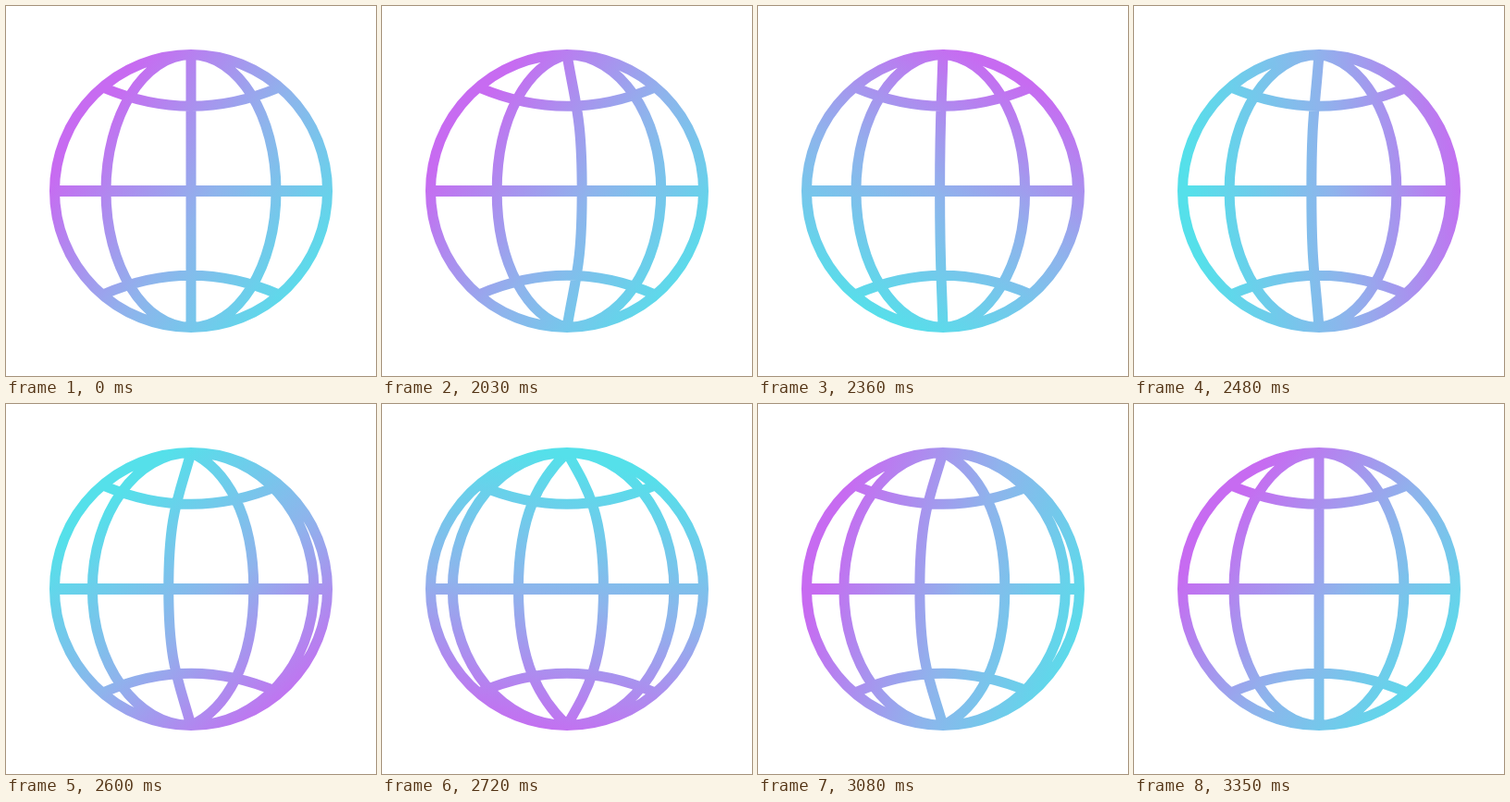
Write an HTML page with a canvas that moves like this. It is 400 by 400 pixels and loops after 3440 ms.

```html
<!DOCTYPE html>
<html lang="en">
<head>
<meta charset="utf-8">
<title>Spinning globe</title>
<style>
  html, body { margin: 0; width: 100%; height: 100%; overflow: hidden; background: #fff; }
  canvas { display: block; width: 100vw; height: 100vh; }
</style>
</head>
<body>
<canvas id="stage" width="400" height="400"></canvas>
<script>
const ctx = document.getElementById('stage').getContext('2d');

const LOOP = 3440, REST = 2000, STEP = 30, STEPS = 45;
const CENTER = 200, RADIUS = 147.5, INNER = 92;
const KAPPA = 0.5523;         // circle-to-Bézier handle ratio
const POLE_HANDLE = 66;       // pole handle of the straight meridian
const TURNS = 7;              // meridian spacings travelled per spin
const START_ANGLE = 216;      // direction of the purple pole, degrees

function cubicBezier(x1, y1, x2, y2) {
  const at = (s, a, b) => 3 * s * (1 - s) ** 2 * a + 3 * s * s * (1 - s) * b + s ** 3;
  return x => {
    if (x <= 0 || x >= 1) return Math.min(1, Math.max(0, x));
    let lo = 0, hi = 1;
    for (let i = 0; i < 30; i++) {
      const mid = (lo + hi) / 2;
      if (at(mid, x1, x2) < x) lo = mid; else hi = mid;
    }
    return at(lo, y1, y2);
  };
}
const spinEase = cubicBezier(0.167, 0.167, 0.455, 1);
const colorEase = cubicBezier(0.333, 0, 0.46, 1);

function makeGradient(progress) {
  const angle = (START_ANGLE + 360 * colorEase(progress)) * Math.PI / 180;
  const mid = 216, dx = 152 * Math.cos(angle), dy = 152 * Math.sin(angle);
  const g = ctx.createLinearGradient(mid + dx, mid + dy, mid - dx, mid - dy);
  g.addColorStop(0, '#c76bf1');
  g.addColorStop(0.5, '#8eb4ec');
  g.addColorStop(1, '#55e0ea');
  return g;
}

// Signed half-width: straight at 0, INNER at 1, the rim at 2.
function bulge(u) {
  const a = Math.abs(u);
  return Math.sign(u) * (a < 1 ? a * INNER : INNER + (a - 1) * (RADIUS - INNER));
}

// Morphs from a straight line through pointed lenses to a half ellipse.
function meridian(u) {
  const rx = bulge(u), side = CENTER + rx, poleX = CENTER + KAPPA * rx;
  const top = CENTER - RADIUS, bottom = CENTER + RADIUS;
  const lean = POLE_HANDLE * Math.max(0, 1 - Math.abs(u));
  const handle = KAPPA * RADIUS;
  ctx.moveTo(CENTER, top);
  ctx.bezierCurveTo(poleX, top + lean, side, CENTER - handle, side, CENTER);
  ctx.bezierCurveTo(side, CENTER + handle, poleX, bottom - lean, CENTER, bottom);
}

function parallel(endY, controlY) {
  ctx.moveTo(106, endY);
  ctx.quadraticCurveTo(CENTER, controlY, 294, endY);
}

function draw(time) {
  const step = Math.floor((time - REST) / STEP);
  const progress = Math.min(1, Math.max(0, step / STEPS));
  const spin = TURNS * spinEase(progress);
  const phase = spin % 1;

  ctx.fillStyle = '#fff';
  ctx.fillRect(0, 0, 400, 400);
  ctx.strokeStyle = makeGradient(progress);
  ctx.lineWidth = 11;
  ctx.beginPath();
  ctx.arc(CENTER, CENTER, RADIUS, 0, 2 * Math.PI);
  // A new meridian leaves the rim only once the spin is under way.
  for (let i = spin > 0.2 ? -2 : -1; i < 2; i++) meridian(i + phase);
  parallel(88.5, 128);
  parallel(311.5, 271);
  ctx.stroke();

  ctx.lineWidth = 12;
  ctx.beginPath();
  ctx.moveTo(CENTER - RADIUS, CENTER);
  ctx.lineTo(CENTER + RADIUS, CENTER);
  ctx.stroke();
}

const start = performance.now();
function tick() {
  draw((performance.now() - start) % LOOP);
  requestAnimationFrame(tick);
}
tick();
</script>
</body>
</html>
```
